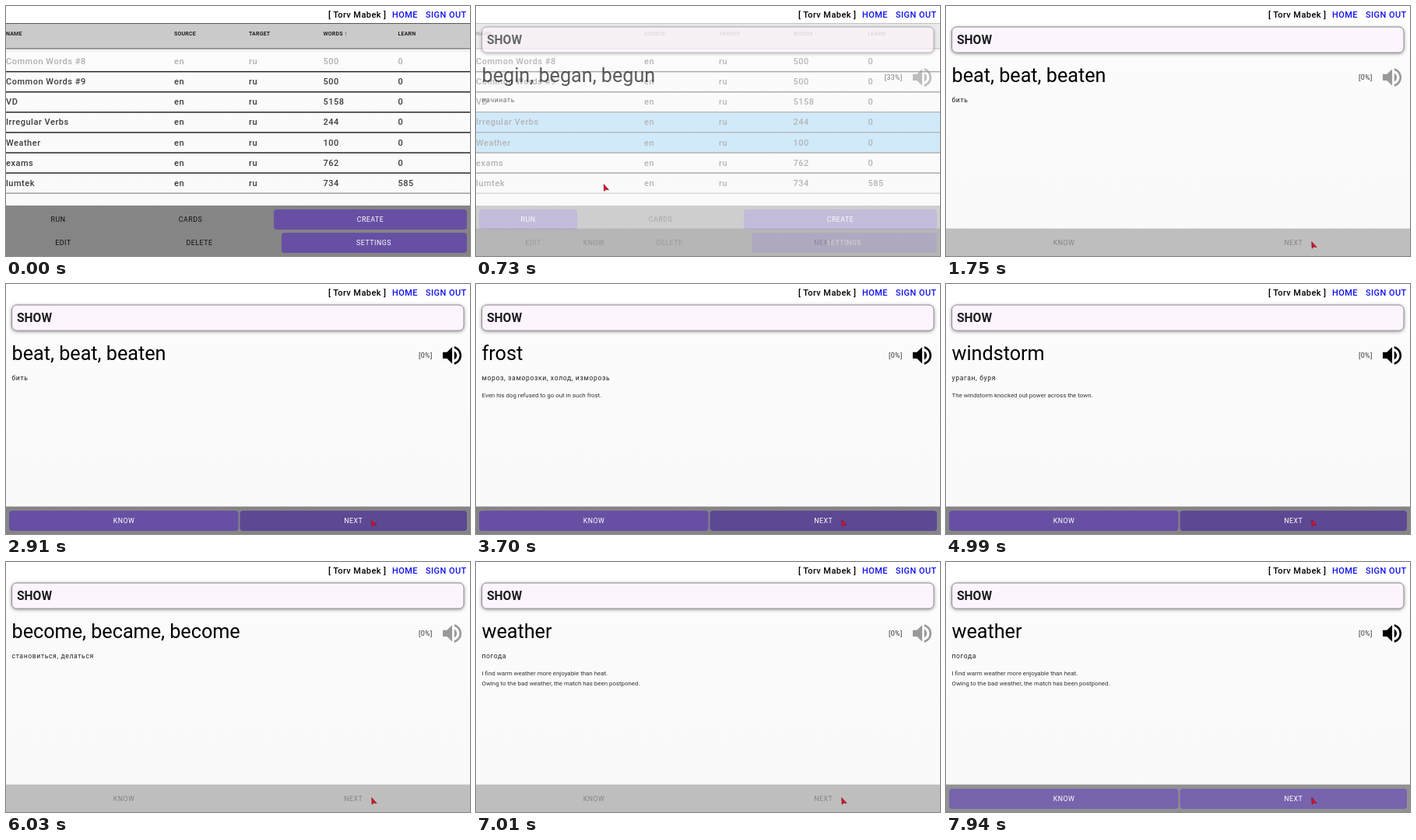
These frames come from a looping animation (596 px wide and 322 px high, 8000 ms). An HTML page:

```html
<!DOCTYPE html>
<html>
<head>
<meta charset="utf-8">
<style>
  html, body { margin: 0; height: 100%; overflow: hidden; background: #fff }
  svg { display: block; width: 596px; height: 322px; font-family: Roboto, sans-serif; white-space: pre }
  .top { font-size: 11px; font-weight: 500; letter-spacing: .42px }
  .head { font-size: 7px; font-weight: 700; letter-spacing: .2px; fill: #222 }
  .cell { font-size: 11px; font-weight: 500; letter-spacing: .52px; fill: #3c3c3c }
  .btn { font-size: 8.8px; letter-spacing: .5px; text-anchor: middle; fill: #111 }
  .on { fill: #fff }
  .word { font-size: 25.2px }
  .tr { font-size: 8.6px; letter-spacing: .63px; fill: #222 }
  .ex { font-size: 7.9px; fill: #333 }
</style>
</head>
<body>
<svg id="stage" viewBox="0 0 596 322"></svg>
<script>
const LOOP = 8000, PURPLE = '#6750a4', BAR = '#858585';
const stage = document.getElementById('stage');

const rect = (x, y, w, h, fill, more = '') =>
  `<rect x="${x}" y="${y}" width="${w}" height="${h}" fill="${fill}" ${more}/>`;
const text = (x, y, cls, s, more = '') => `<text x="${x}" y="${y}" class="${cls}" ${more}>${s}</text>`;
const button = (x, y, w, fill = PURPLE) => rect(x, y, w, 26, fill, 'rx="4"');

const COLUMNS = [0, 216, 312, 407.5, 503.5];
const ROWS = [['Common Words #8', 500, 0], ['Common Words #9', 500, 0], ['VD', 5158, 0],
  ['Irregular Verbs', 244, 0], ['Weather', 100, 0], ['exams', 762, 0], ['lumtek', 734, 585]];

const row = ([name, words, learn], i) => {
  const y = 58.5 + 26.1 * i;
  return rect(0, y + .7, 596, 24.7, '#87cefa', `id="row${i}" opacity="0"`) +
    rect(0, y + 25.4, 596, 1.4, i < 6 ? '#1a1a1a' : '#999') +
    `<g id="cells${i}">` + [name, 'en', 'ru', words, learn]
      .map((s, c) => text(COLUMNS[c], y + 16.6, 'cell', s)).join('') + '</g>';
};

const list = rect(0, 22, 596, 33, '#cacaca') +
  rect(0, 22, 596, 1, '#555') + rect(0, 54.5, 596, 1, '#555') + rect(0, 57.5, 596, 1, '#e4e4e4') +
  ['NAME', 'SOURCE', 'TARGET', 'WORDS ↑', 'LEARN'].map((s, c) => text(COLUMNS[c], 37.5, 'head', s)).join('') +
  ROWS.map(row).join('') + rect(0, 257, 596, 65, BAR) +
  `<g id="run" opacity="0">${button(4, 262, 126)}</g>` + button(344, 262, 248) + button(354, 292, 238) +
  text(67, 278, 'btn', 'RUN', 'id="runLabel"') + text(237, 278, 'btn', 'CARDS') + text(468, 278, 'btn on', 'CREATE') +
  text(73.5, 307.5, 'btn', 'EDIT') + text(248.5, 307.5, 'btn', 'DELETE') + text(472.5, 307.5, 'btn on', 'SETTINGS');

const card = rect(7.6, 27, 580.4, 33, '#fdf5fe', 'rx="6" stroke="#8c868e" filter="url(#shadow)"') +
  text(14, 48.8, '', 'SHOW', 'font-size="15.6" font-weight="700" fill="#1c1b1f"') +
  text(7.5, 98, 'word', '', 'id="word"') + text(7.5, 124, 'tr', '', 'id="translation"') +
  text(7.5, 146, 'ex', '', 'id="example0"') + text(7.5, 159.3, 'ex', '', 'id="example1"') +
  text(547.7, 94.8, '', '', 'id="score" font-size="9" letter-spacing=".3" fill="#333" text-anchor="end"') +
  `<path id="speaker" transform="translate(557 75.8) scale(1.34)" d="M3 9v6h4l5 5V4L7 9H3zm13.5 3c0-1.77-1.02-3.29-2.5-4.03v8.05c1.48-.73 2.5-2.25 2.5-4.02zM14 3.23v2.06c2.89.86 5 3.54 5 6.71s-2.11 5.85-5 6.71v2.06c4.01-.91 7-4.49 7-8.77s-2.99-7.86-7-8.77z"/>` +
  `<g id="footer">${rect(0, 286.6, 596, 36, BAR)}
    <g id="buttons">${button(4, 292, 294.5)}${button(300.5, 292, 291.5)}
      <g clip-path="url(#next)"><circle id="hover" cx="471" cy="305" opacity=".1"/>
      <circle id="press" cx="471" cy="305" fill="#fff" opacity=".12"/></g></g>
    ${text(151.5, 307.5, 'btn', 'KNOW', 'id="know"')}${text(446.3, 307.5, 'btn', 'NEXT', 'id="nextLabel"')}</g>`;

stage.innerHTML = `<defs>
    <linearGradient id="paper" x2="0" y2="1"><stop stop-color="#fff"/><stop offset=".2" stop-color="#fbfbfb"/><stop offset="1" stop-color="#f9f9f9"/></linearGradient>
    <filter id="shadow" x="-5%" y="-30%" width="110%" height="160%"><feDropShadow dx="0" dy="1" stdDeviation="2.2" flood-opacity=".42"/></filter>
    <clipPath id="next">${button(300.5, 292, 291.5)}</clipPath>
  </defs>` + rect(0, 22, 596, 300, 'url(#paper)') +
  text(414, 14.6, 'top', '[ Torv Mabek ]') + text(496, 14.6, 'top', 'HOME', 'fill="#11e"') +
  text(539, 14.6, 'top', 'SIGN OUT', 'fill="#11e"') +
  `<g id="list">${list}</g><g id="card">${card}</g>
  <path id="cursor" d="M.2 1 .6 9.8 3 7.8 6.6 8.2Z" fill="#d8122c" stroke="#7a1020" stroke-width=".6"/>`;

const el = id => document.getElementById(id);
const set = (id, name, value) => el(id).setAttribute(name, value);
const ramp = (t, from, to) => Math.min(1, Math.max(0, (t - from) / (to - from)));

const WORDS = [
  [0, 'begin, began, begun', 'начинать', 33],
  [1640, 'beat, beat, beaten', 'бить', 0],
  [3180, 'frost', 'мороз, заморозки, холод, изморозь', 0, 'Even his dog refused to go out in such frost.'],
  [3990, 'windstorm', 'ураган, буря', 0, 'The windstorm knocked out power across the town.'],
  [5910, 'become, became, become', 'становиться, делаться', 0],
  [6910, 'weather', 'погода', 0, 'I find warm weather more enjoyable than heat.',
    'Owing to the bad weather, the match has been postponed.']
];

// Buttons are active in these spans: enabled, pressed, disabled again
const ACTIVE = [[1300, 1480, 1640], [2410, 2910, 3180], [3540, 3960, 3990], [4340, 4440, 4500],
  [4890, 5850, 5910], [6780, 6850, 6910], [7320, 7400, 7460], [7920, 9000, 9000]];

// Cursor stops: time, x, y
const PATH = [[40, 60, 148], [180, 60, 150], [300, 62, 175], [380, 62, 176], [520, 68, 276], [600, 70, 275],
  [730, 163.5, 229], [830, 206, 190], [890, 245, 163], [1140, 469.5, 302.5]];

function moveCursor(t) {
  let i = PATH.findIndex(p => p[0] > t);
  if (i < 0) i = PATH.length;
  const a = PATH[Math.max(0, i - 1)], b = PATH[Math.min(i, PATH.length - 1)];
  const k = a === b ? 0 : ramp(t, a[0], b[0]);
  set('cursor', 'transform', `translate(${a[1] + (b[1] - a[1]) * k} ${a[2] + (b[2] - a[2]) * k})`);
  set('cursor', 'opacity', t < PATH[0][0] ? 0 : 1);
}

function drawCard(t) {
  const [, word, translation, score, ...examples] = WORDS.findLast(w => w[0] <= t);
  el('word').textContent = word;
  el('translation').textContent = translation;
  el('score').textContent = `[${score}%]`;
  [0, 1].forEach(i => el('example' + i).textContent = examples[i] || '');

  const [on, press, off] = ACTIVE.findLast(a => a[0] <= t) || [9e3, 9e3, 9e3];
  const level = t < on ? 0 : ramp(t, on - 25, on + 35) * (1 - ramp(t, off, off + 100));
  const enabled = t >= on && t < off;
  set('footer', 'opacity', .5 + .5 * level);
  set('buttons', 'opacity', Math.min(1, level * 1.4));
  set('speaker', 'fill', enabled ? '#000' : '#999');
  for (const id of ['know', 'nextLabel']) set(id, 'class', level > .4 ? 'btn on' : 'btn');
  set('hover', 'r', Math.max(0, (t - on - 20) * 2.1));
  set('press', 'r', Math.max(0, (t - press) * 2.1));
}

function frame(now) {
  const t = now % LOOP;
  const fade = ramp(t, 600, 805);
  set('cells0', 'opacity', .4 + .6 * ramp(t, 30, 150));
  set('row3', 'opacity', ramp(t, 180, 240));
  set('row4', 'opacity', ramp(t, 340, 400));
  set('run', 'opacity', ramp(t, 200, 260));
  set('runLabel', 'class', t > 230 ? 'btn on' : 'btn');
  set('list', 'opacity', 1 - fade);
  set('card', 'opacity', fade);
  drawCard(t);
  moveCursor(t);
  requestAnimationFrame(() => frame(performance.now()));
}
frame(0);
</script>
</body>
</html>
```
